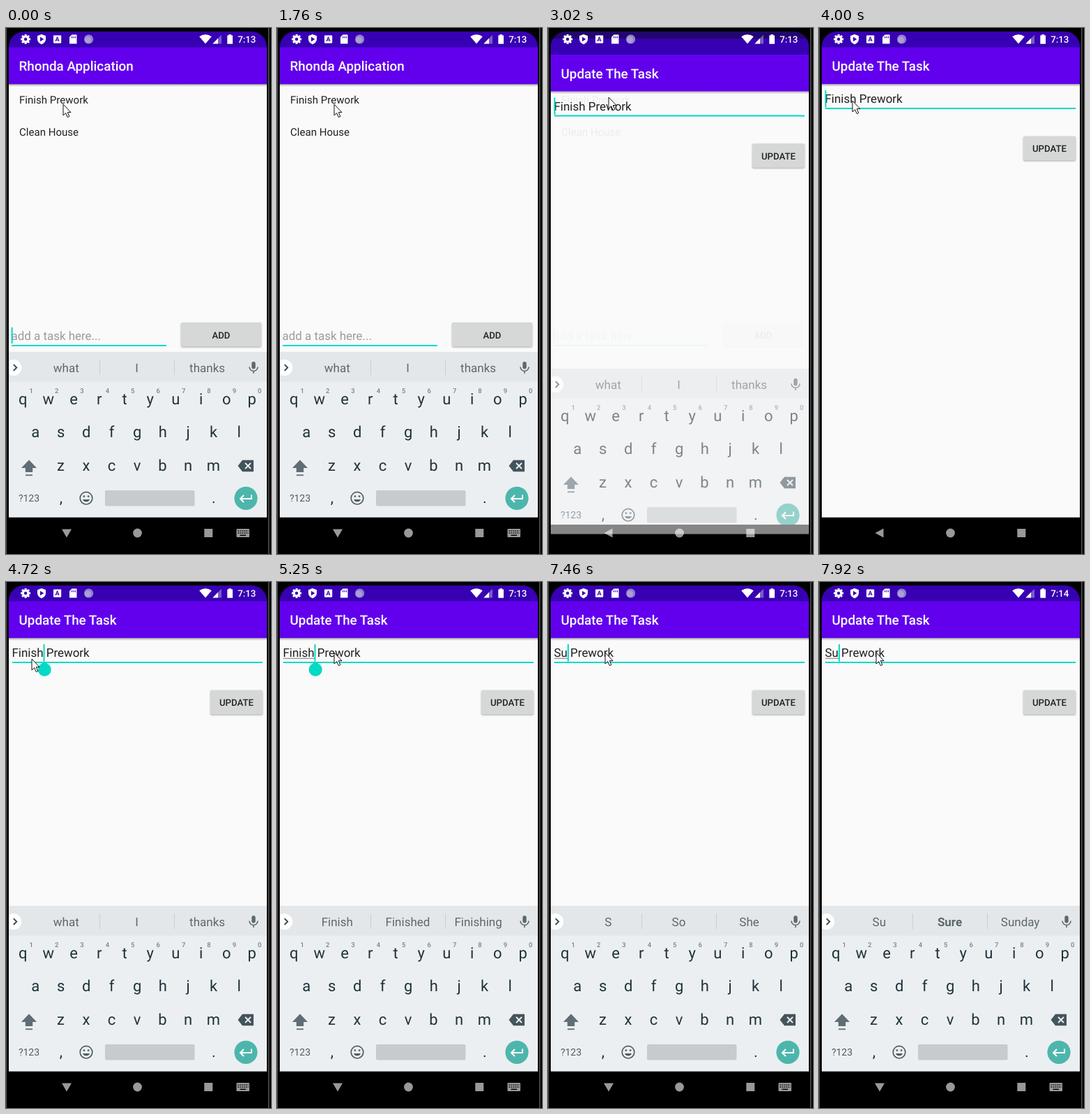
An HTML page that plays this animation: 380x752 px, repeating every 8 s.

```html
<!DOCTYPE html>
<html lang="en">
<head>
<meta charset="utf-8">
<title>Task list</title>
<style>
  html, body { margin: 0; width: 100%; height: 100%; overflow: hidden; background: #000; }
  svg { display: block; width: 380px; height: 752px; font-family: Roboto, sans-serif; }
  text { white-space: pre; text-rendering: geometricPrecision; }
  .mid { text-anchor: middle; }
  .bar { font-size: 18.83px; font-weight: 500; fill: #fff; }
  .item { font-size: 15.07px; fill: #212121; }
  .field { font-size: 16.95px; fill: #212121; }
  .hint { font-size: 16.95px; fill: #9b9b9b; }
  .button { font-size: 13.18px; font-weight: 500; fill: #212121; }
  .raised { fill: #d6d7d7; filter: drop-shadow(0 1px 1px rgba(0, 0, 0, .32)); }
  .key { font-size: 22px; fill: #1f333c; }
  .digit { font-size: 9.5px; font-weight: 500; fill: #76838a; }
  .word { font-size: 17px; fill: #5d686e; }
</style>
</head>
<body>
<svg id="stage" viewBox="0 0 380 752"></svg>
<script>
const LOOP = 8000;
const NAV_TOP = 699.7;
const stage = document.getElementById('stage');

const rect = (x, y, w, h, fill, extra = '') =>
  `<rect x="${x}" y="${y}" width="${w}" height="${h}" fill="${fill}" ${extra}/>`;
const path = (d, fill, extra = '') => `<path d="${d}" fill="${fill}" ${extra}/>`;
const line = (d, color, width, extra = '') =>
  path(d, 'none', `stroke="${color}" stroke-width="${width}" ${extra}`);
const circle = (x, y, r, fill, extra = '') =>
  `<circle cx="${x}" cy="${y}" r="${r}" fill="${fill}" ${extra}/>`;
const text = (x, y, cls, str, id = '') =>
  `<text x="${x}" y="${y}" class="${cls}" ${id && `id="${id}"`}>${str}</text>`;
const group = (id, body, extra = '') => `<g id="${id}" ${extra}>${body}</g>`;
const button = (x, y, w, label) =>
  `<rect x="${x}" y="${y}" width="${w}" height="34.4" rx="2" class="raised"/>` +
  text(x + w / 2, y + 22.6, 'button mid', label);

const page = title =>
  rect(4, -20, 370, 25, '#22066f') + rect(4, 5, 370, 23, '#3700b3') +
  rect(4, 27.6, 370, 52.7, '#6200ee') + rect(4, 80.3, 370, 620, '#fafafa') +
  rect(4, 80.3, 370, 3.6, 'url(#shade)') + text(18.5, 61, 'bar', title);

const listItems =
  text(19, 108.4, 'item', 'Finish Prework') + text(19, 153.8, 'item', 'Clean House') +
  text(7.5, 445.6, 'hint', 'add a task here...') +
  rect(8, 453, 222, 2, '#03dac5') +
  rect(7.6, 428, 2, 23, '#03dac5', 'id="listCaret"') +
  button(251, 421, 115, 'ADD');

const editPage = page('Update The Task') +
  text(8.5, 107.3, 'field', '', 'typed') + text(8.5, 107.3, 'field', ' Prework', 'rest') +
  rect(9, 108.7, 0, 1, '#777', 'id="composing"') +
  rect(9, 114, 359, 2, '#03dac5') +
  rect(8.5, 89, 2, 24.5, '#03dac5', 'id="caret"') +
  group('handle', path('M55.2 114.5L62.2 119H48.2Z', '#03dac5') + circle(55.2, 125.3, 9.5, '#03dac5')) +
  button(293, 154.8, 75, 'UPDATE');

function keyRow(letters, x, y) {
  return [...letters].map((c, i) => text(x + i * 36.5, y, 'key mid', c)).join('');
}

const digits = [...'1234567890']
  .map((d, i) => text(36.2 + i * 36.4, 522, 'digit mid', d)).join('');

const keyboard =
  rect(4, 463, 370, 237, '#eceff1') + rect(4, 463, 370, 42.5, '#e3e7ea') +
  circle(10.8, 485.6, 11.5, '#fff') + line('M10.8 481.2L15.2 485.6L10.8 490', '#37474f', 1.9) +
  rect(134, 474, 1, 22, '#c9cfd2') + rect(241, 474, 1, 22, '#c9cfd2') +
  [86.3, 187.5, 288.6].map((x, i) => text(x, 492.2, 'word mid', '', 'word' + i)).join('') +
  rect(352.3, 477, 5.4, 10.5, '#5d686e', 'rx="2.7"') +
  line('M349 484.5a6 6 0 0 0 12 0M355 490.5V494', '#5d686e', 1.6) +
  keyRow('qwertyuiop', 24.2, 538) + digits +
  keyRow('asdfghjkl', 42.2, 585.4) + keyRow('zxcvbnm', 78.5, 633) +
  path('M33 617.5L44 629H38.2V635H27.8V629H22Z', '#5f6d74') + rect(28, 638.4, 10, 1.8, '#5f6d74') +
  path('M332.5 626L339 617.8H355V634.2H339Z', '#44545c') +
  line('M343 622L351 630M351 622L343 630', '#eceff1', 1.9) +
  `<text x="33" y="677.2" class="mid" font-size="14" fill="#4f5d64">?123</text>` +
  text(79, 679, 'key mid', ',') + text(298, 679, 'key mid', '.') +
  circle(115, 672.2, 8.8, 'none', 'stroke="#4f5d64" stroke-width="1.7"') +
  circle(111.9, 669.6, 1.4, '#4f5d64') + circle(118.1, 669.6, 1.4, '#4f5d64') +
  path('M110 674H120A5.3 5 0 0 1 110 674Z', '#4f5d64') +
  rect(142, 661, 128.5, 22.5, '#c6cbcd', 'rx="2"') +
  circle(344, 672.3, 16.6, '#4db6ac') +
  line('M352 667.5V673H336.5M341 668L336 673L341 678', '#fff', 2);

const teeth = Array.from({ length: 8 }, (_, i) =>
  rect(26.6, 9, 3, 4, '#fff', `transform="rotate(${i * 45} 28.1 16)"`)).join('');

const status =
  teeth + circle(28.1, 16, 3.7, 'none', 'stroke="#fff" stroke-width="3"') +
  path('M51 9L57 11.3V15.5C57 19.4 54.5 22 51 23.4C47.5 22 45 19.4 45 15.5V11.3Z', '#fff') +
  path('M49 12.8L54.3 16L49 19.2Z', '#3700b3') +
  rect(68, 10.5, 11.2, 11.2, '#fff', 'rx="1"') +
  `<text x="73.6" y="19.4" class="mid" font-size="9" font-weight="700" fill="#3700b3">A</text>` +
  path('M94.5 9.5H101.5V22.5H91V13Z', '#fff') +
  line('M94.6 12V14.6M97 12V14.6M99.4 12V14.6', '#3700b3', 1.1) +
  circle(118.6, 16, 6.6, '#8f80cf') + circle(117.4, 17, 4.6, '#b9acd9', 'opacity=".7"') +
  path('M286 22.6L277.2 12.2Q286 6.2 294.8 12.2Z', '#fff') +
  path('M309 9.8V22.4H296.4Z', '#fff', 'opacity=".35"') + path('M304 14.8V22.4H296.4Z', '#fff') +
  path('M319.3 9.3H323V10.6H325V22.8H317.3V10.6H319.3Z', '#fff') +
  `<text id="clock" x="332.2" y="20.9" font-size="13.3" font-weight="500" fill="#fff"></text>`;

const keyboardIcon = rect(330.5, 716, 18.5, 12, '#fff', 'rx="1"') +
  line('M332.5 719H347.5M332.5 722H347.5', '#000', 1.4, 'stroke-dasharray="1.5 1.3"') +
  rect(335.5, 724.6, 8.5, 1.4, '#000');

const nav =
  path('', '#fff', 'id="back"') + circle(188.5, 722, 6.4, '#fff') +
  rect(284.3, 716, 12, 12, '#fff') + group('kbIcon', keyboardIcon);

const pointer = path('M0 0V16L3.7 12.6L6.3 18.6L8.8 17.5L6.3 11.6H11Z', '#fff',
  'id="mouse" stroke="#111" stroke-width="1"');

stage.innerHTML = `
  <defs>
    <linearGradient id="shade" x2="0" y2="1">
      <stop stop-color="#000" stop-opacity=".3"/><stop offset="1" stop-color="#000" stop-opacity="0"/>
    </linearGradient>
    <clipPath id="screen"><rect x="4" y="5" width="370" height="770" rx="22"/></clipPath>
  </defs>` +
  rect(0, 0, 380, 752, '#000') + rect(0, 0, 1, 752, '#555') + rect(376, 0, 1.5, 752, '#555') +
  group('view',
    page('Rhonda Application') + group('edit', editPage) + group('items', listItems) +
    group('kb', keyboard) + rect(4, NAV_TOP, 370, 53, '#000', 'id="navBack"') +
    rect(4, 710, 370, 13.5, '#868686', 'id="navFade"') +
    group('nav', nav, 'opacity=".6"') + status,
    'clip-path="url(#screen)"') + pointer;

const $ = Object.fromEntries([...stage.querySelectorAll('[id]')].map(el => [el.id, el]));

// Each step lists only what changes at that time.
const IDLE = ['what', 'I', 'thanks'];
const steps = [
  [0, { caret: 1, mouse: [82, 109], list: 1, edit: 0, editY: 0, kb: 1, kbY: 0, fade: 0,
        typed: 'Finish', words: IDLE, composing: 0, at: 0, handle: 0, clock: '7:13' }],
  [280, { caret: 0 }],
  [870, { caret: 1 }],
  [1760, { caret: 0 }],
  [1880, { mouse: [85, 103], caret: 1 }],
  [2030, { mouse: [87, 99] }],
  [2320, { caret: 0 }],
  [2880, { caret: 1 }],
  [3020, { list: .06, edit: 1, editY: 10.5, kb: .58, kbY: 24, fade: 1 }],
  [3170, { list: 0, editY: 0, kb: 0, fade: 0 }],
  [3450, { mouse: [76, 110], caret: 0 }],
  [3590, { mouse: [58, 109] }],
  [3730, { mouse: [48, 104] }],
  [4000, { caret: 1 }],
  [4250, { mouse: [44, 108], at: 1, handle: 1 }],
  [4400, { mouse: [37, 110], kb: .6, kbY: 24 }],
  [4550, { kb: .9, kbY: 6 }],
  [4690, { kb: 1, kbY: 0 }],
  [4830, { composing: 1 }],
  [4980, { words: ['Finish', 'Finished', 'Finishing'] }],
  [5130, { mouse: [86, 104] }],
  [5250, { mouse: [82, 101] }],
  [5690, { typed: 'Finis', handle: 0 }],
  [5840, { typed: 'Fini', words: ['Fini', 'Finish', 'Finally'] }],
  [5990, { typed: 'Fin', words: ['Fin', 'Fine', 'Find'] }],
  [6140, { typed: 'Fi', words: ['Fi', 'First', 'Five'] }],
  [6290, { typed: 'F' }],
  [6440, { words: ['F', 'For', 'From'] }],
  [6570, { typed: '' }],
  [6720, { words: IDLE }],
  [7020, { typed: 'S', words: ['S', 'So', 'She'] }],
  [7460, { typed: 'Su' }],
  [7610, { words: ['Su', '*Sure', 'Sunday'] }],
  [7920, { clock: '7:14' }],
];

let state = {};
const states = steps.map(([at, change]) => [at, state = { ...state, ...change }]);

const set = (el, attrs) => {
  for (const name in attrs) el.setAttribute(name, attrs[name]);
};

function draw(s) {
  set($.items, { opacity: s.list });
  set($.edit, { display: s.edit ? 'inline' : 'none', transform: `translate(0 ${s.editY})` });
  set($.kb, { opacity: s.kb, transform: `translate(0 ${s.kbY})` });
  set($.navBack, { y: NAV_TOP + s.editY });
  set($.navFade, { opacity: s.fade });
  const docked = s.kb && !s.fade;
  set($.back, { d: docked ? 'M80 716.5H94L87 728.5Z' : 'M92.5 715.5V728.5L80.5 722Z' });
  set($.kbIcon, { opacity: docked ? 1 : 0 });

  $.typed.textContent = s.typed;
  const width = s.edit && s.typed ? $.typed.getComputedTextLength() : 0;
  set($.rest, { x: 8.5 + width });
  set($.composing, { width: s.composing ? width : 0 });
  set($.caret, { x: 8.5 + (s.at ? width : 0), opacity: s.caret });
  set($.listCaret, { opacity: s.caret });
  set($.handle, { opacity: s.handle });

  s.words.forEach((word, i) => {
    const el = $['word' + i];
    el.textContent = word.replace('*', '');
    set(el, { 'font-weight': word[0] === '*' ? 700 : 400 });
  });
  $.clock.textContent = s.clock;
  set($.mouse, { transform: `translate(${s.mouse})` });
}

let shown;
function tick() {
  const t = performance.now() % LOOP;
  const [, current] = states.findLast(([at]) => at <= t);
  if (current !== shown) draw(shown = current);
  requestAnimationFrame(tick);
}
tick();
document.fonts.ready.then(() => draw(shown));
</script>
</body>
</html>
```
